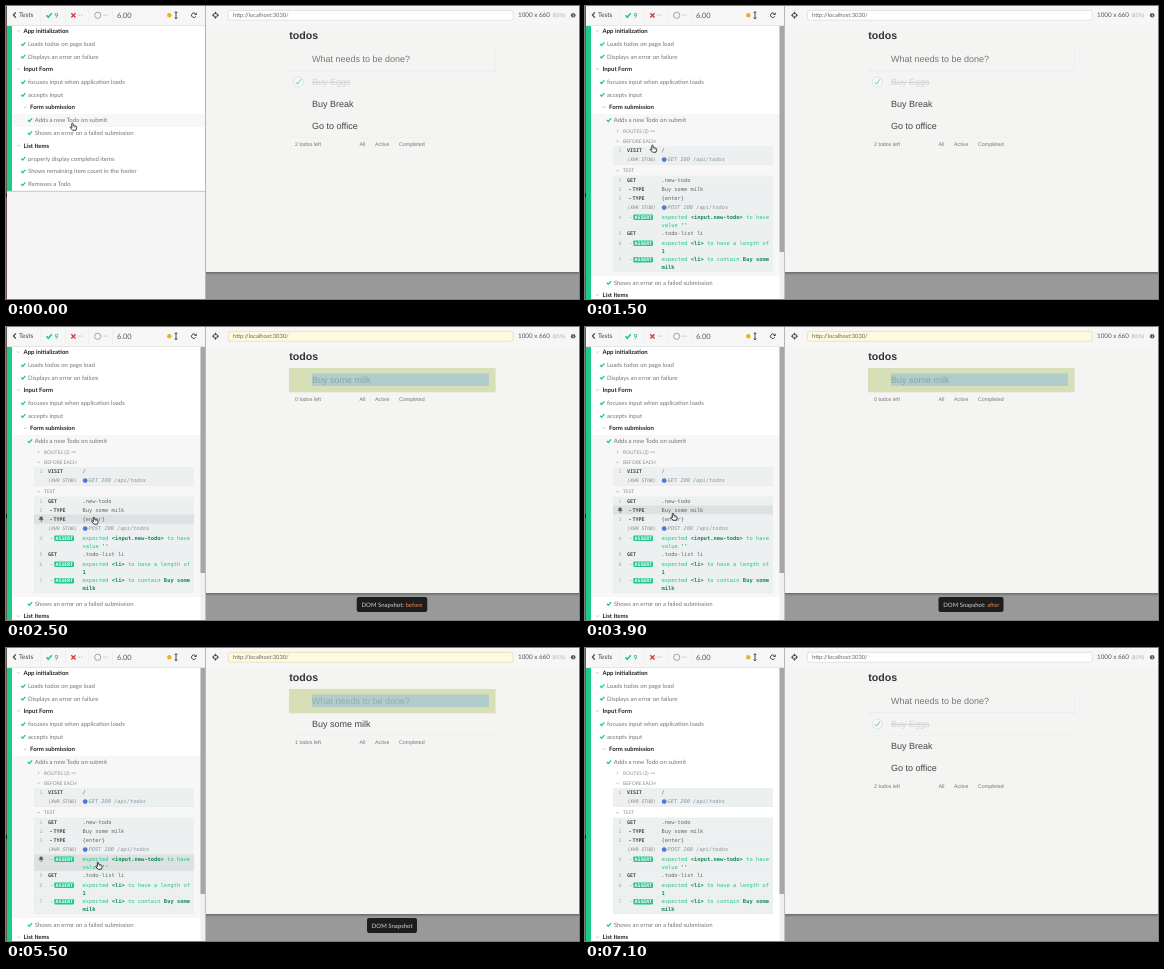
Animation, 573 px wide and 293 px high, one loop 7.5 s. Source, as an HTML page with a canvas:

```html
<!DOCTYPE html>
<html lang="en">
<head>
<meta charset="utf-8">
<title>Test runner</title>
<style>
html, body { margin: 0; width: 100%; height: 100%; overflow: hidden; background: #f5f5f5; }
canvas { display: block; width: 573px; height: 293px; }
</style>
</head>
<body>
<canvas id="stage"></canvas>
<script>
const W = 573, H = 293, LOOP = 7500, STEP = 100;
const UI = 'Lato, sans-serif';
const PAGE = '"Liberation Sans", sans-serif';
const MONO = '"DejaVu Sans Mono", monospace';
const GREEN = '#1fc98a', DARK_GREEN = '#14a56d';

const canvas = document.getElementById('stage');
const ctx = canvas.getContext('2d');
const scale = window.devicePixelRatio || 1;
canvas.width = Math.round(W * scale);
canvas.height = Math.round(H * scale);

// Pointer tip: time, x, y
const PATH = [
  [0, 66.5, 116], [1200, 66.5, 116], [1800, 68.5, 160], [2000, 74, 167],
  [2100, 79, 174], [2200, 83, 179.5], [2300, 86, 183], [2400, 86, 183],
  [2500, 88, 189], [2700, 88.5, 193.5], [2800, 88.5, 193.5], [3100, 88, 183],
  [3800, 88, 183], [3900, 88, 185], [4000, 88, 189], [4100, 88.5, 193],
  [4700, 88.5, 193], [4800, 88.5, 194.5], [5500, 92, 213], [6700, 92, 213],
  [6800, 75, 214], [6900, 45, 216], [7000, 10, 218]
];

const ROWS = [
  { id: 'visit', top: 140, bottom: 149, num: 1, name: 'VISIT', text: '/' },
  { id: 'load', top: 149, bottom: 159, stub: 'GET 200 /api/todos' },
  { id: 'get', top: 169.5, bottom: 178.5, num: 1, name: 'GET', text: '.new-todo' },
  { id: 'type', top: 178.5, bottom: 187.5, num: 2, name: 'TYPE', child: true, text: 'Buy some milk' },
  { id: 'enter', top: 187.5, bottom: 197, num: 3, name: 'TYPE', child: true, text: '{enter}' },
  { id: 'post', top: 197, bottom: 206.5, stub: 'POST 200 /api/todos' },
  { id: 'assert', top: 206.5, bottom: 223, num: 4, claim: ['expected ', '*<input.new-todo>', ' to have'], rest: "value *''" },
  { id: 'items', top: 223, bottom: 232.5, num: 5, name: 'GET', text: '.todo-list li' },
  { id: 'count', top: 232.5, bottom: 249, num: 6, claim: ['expected ', '*<li>', ' to have a length of'], rest: '*1' },
  { id: 'contain', top: 249, bottom: 266, num: 7, claim: ['expected ', '*<li>', ' to contain ', '*Buy some'], rest: '*milk' }
];

const NEW_TODO = [{ text: 'Buy some milk' }];
const FULL = [{ text: 'Buy Eggs', done: true }, { text: 'Buy Break' }, { text: 'Go to office' }];
const HINT = 'What needs to be done?';
const LIVE = { hint: true, input: HINT, items: FULL, left: 2 };
const snap = (input, lit, label, items = []) =>
  ({ input, lit, label, items, left: items.length, hint: input === HINT, shot: true });

function view(id, t) {
  switch (id) {
    case 'visit':
    case 'load': return snap(HINT, false, '');
    case 'get': return snap(HINT, true, '');
    case 'type': return t >= 3900 ? snap('Buy some milk', true, 'after') : snap('', true, 'before');
    case 'enter': return snap('Buy some milk', true, 'before');
    case 'post': return snap('Buy some milk', false, '');
    case 'assert': return snap(HINT, true, '', NEW_TODO);
    default: return LIVE;
  }
}

function pointer(t) {
  if (t >= 7100) return null;
  const i = PATH.findIndex(p => p[0] > t);
  if (i < 0) return PATH[PATH.length - 1].slice(1);
  const [t0, x0, y0] = PATH[i - 1], [t1, x1, y1] = PATH[i];
  const k = (t - t0) / (t1 - t0);
  return [x0 + (x1 - x0) * k, y0 + (y1 - y0) * k];
}

function rect(x, y, w, h, color) {
  ctx.fillStyle = color;
  ctx.fillRect(x, y, w, h);
}

function round(x, y, w, h, r, fill, stroke) {
  ctx.beginPath();
  ctx.roundRect(x, y, w, h, r);
  ctx.fillStyle = fill;
  ctx.fill();
  if (stroke) {
    ctx.strokeStyle = stroke;
    ctx.lineWidth = 0.7;
    ctx.stroke();
  }
}

function text(str, x, y, size, color, family = UI, style = '') {
  ctx.font = `${style} ${size}px ${family}`;
  ctx.fillStyle = color;
  ctx.fillText(str, x, y);
  return ctx.measureText(str).width;
}

function line(points, color, width) {
  ctx.beginPath();
  points.forEach(([x, y], i) => i ? ctx.lineTo(x, y) : ctx.moveTo(x, y));
  ctx.strokeStyle = color;
  ctx.lineWidth = width;
  ctx.stroke();
}

function circle(x, y, r, fill, stroke, width = 0.8) {
  ctx.beginPath();
  ctx.arc(x, y, r, 0, Math.PI * 2);
  if (fill) { ctx.fillStyle = fill; ctx.fill(); }
  if (stroke) { ctx.strokeStyle = stroke; ctx.lineWidth = width; ctx.stroke(); }
}

const check = (x, y, s = 1) =>
  line([[x - 2 * s, y], [x - 0.6 * s, y + 1.5 * s], [x + 2.2 * s, y - 1.6 * s]], GREEN, 1.3 * s);
const caret = (x, y) => line([[x - 1.3, y - 0.7], [x, y + 0.6], [x + 1.3, y - 0.7]], '#999', 0.6);

function suite(title, x, y) {
  caret(x - 5, y);
  text(title, x, y + 2.1, 6, '#222', UI, 'bold');
}

function test(title, x, y) {
  check(x - 4.8, y);
  text(title, x, y + 2.1, 6, '#757575');
}

function refresh(x, y) {
  ctx.beginPath();
  ctx.arc(x, y, 2.3, 0.5, 5.4);
  ctx.strokeStyle = '#444';
  ctx.lineWidth = 1;
  ctx.stroke();
  ctx.beginPath();
  ctx.moveTo(x + 2.9, y - 3);
  ctx.lineTo(x + 2.9, y - 0.3);
  ctx.lineTo(x + 0.3, y - 0.3);
  ctx.fillStyle = '#444';
  ctx.fill();
}

function leftHeader() {
  rect(0, 0, 199, 19, '#f6f6f6');
  line([[9.8, 6.4], [7.4, 9], [9.8, 11.6]], '#444', 1.2);
  text('Tests', 13, 11.4, 6.5, '#444');
  check(43, 9.3, 1.25);
  text('9', 48.5, 11.7, 7, DARK_GREEN);
  line([[65.3, 7.3], [69.5, 11.5]], '#d83a3a', 1.4);
  line([[69.5, 7.3], [65.3, 11.5]], '#d83a3a', 1.4);
  text('--', 72, 11.4, 6.5, '#888');
  circle(91.7, 9.3, 3.1, null, '#999', 0.9);
  text('--', 97, 11.4, 6.5, '#888');
  for (const x of [34, 59, 82.5, 106.5]) rect(x, 2, 0.5, 15, '#e9e9e9');
  text('6.00', 111, 11.8, 7.4, '#5c5c5c');
  circle(163.3, 9.2, 2.2, '#e8b322');
  line([[170, 6], [170, 12.5]], '#333', 0.9);
  line([[168.7, 7], [170, 5.5], [171.3, 7]], '#333', 0.8);
  line([[168.7, 11.5], [170, 13], [171.3, 11.5]], '#333', 0.8);
  refresh(187.8, 9.2);
  rect(0, 19, 199, 0.7, '#dadada');
}

function command(row, hot) {
  const y = row.top + 4.6, base = y + 1.8;
  rect(28, row.top, 160, row.bottom - row.top, hot ? '#dce1e1' : '#edf0f0');
  rect(28, row.bottom - 0.4, 160, 0.4, '#e3e7e7');
  if (row.stub) {
    text('(XHR STUB)', 42, base, 4.8, '#888', MONO, 'italic');
    circle(79.2, y, 2.4, '#5178d6');
    text(row.stub, 82.5, base, 5.3, '#8b93a0', MONO, 'italic');
    return;
  }
  if (hot) {
    rect(33.6, y - 2.4, 3, 2.6, '#555');
    rect(32.9, y + 0.1, 4.4, 0.9, '#555');
    rect(34.8, y + 1, 0.7, 1.9, '#555');
  } else {
    text(row.num, 33.5, base, 4.8, '#aaa', MONO);
  }
  if (row.claim) {
    text('-', 44, base, 5, '#666', MONO);
    round(48.3, y - 2.7, 19.7, 5.5, 0.8, GREEN);
    text('ASSERT', 49.6, y + 1.7, 4.8, '#fff', MONO, 'bold');
    let x = 76.5;
    for (const part of row.claim) x += claim(part, x, base);
    x = 76.5;
    for (const part of row.rest.split(/(?=\*)/)) x += claim(part, x, base + 8);
    return;
  }
  if (row.child) text('-', 43.5, base, 5, '#444', MONO, 'bold');
  text(row.name, row.child ? 47.5 : 42, base, 5, '#444', MONO, 'bold');
  text(row.text, 76.5, base, 5.35, '#666', MONO);
}

function claim(part, x, y) {
  const bold = part[0] === '*';
  return text(bold ? part.slice(1) : part, x, y, 5.42, bold ? '#108a5b' : GREEN, MONO, bold ? 'bold' : '');
}

function leftPanel(open, hover, hotId) {
  rect(0, 0, 199, H, '#f5f5f5');
  const end = open ? H : 185;
  rect(1, 19, 198, end - 19, '#fff');
  if (hover) rect(6, 108, 193, open ? 162 : 13, '#f7f7f7');
  rect(1, 20, 5, end - 20, GREEN);
  suite('App initialization', 17.5, 25);
  test('Loads todos on page load', 22, 38);
  test('Displays an error on failure', 22, 50.5);
  suite('Input Form', 17.5, 63);
  test('focuses input when application loads', 22, 76);
  test('accepts input', 22, 88.7);
  suite('Form submission', 24, 101.2);
  test('Adds a new Todo on submit', 28.7, 114);
  if (open) {
    line([[32, 123.8], [33.2, 125], [32, 126.2]], '#999', 0.6);
    text('ROUTES (2)', 38, 126.8, 4.9, '#8c8c8c');
    rect(65.5, 124.7, 4.5, 0.7, '#999');
    caret(32.5, 135.3);
    text('BEFORE EACH', 38, 137, 4.9, '#8c8c8c');
    caret(32.5, 164.7);
    text('TEST', 38, 166.4, 4.9, '#8c8c8c');
    for (const row of ROWS) command(row, row.id === hotId);
    test('Shows an error on a failed submission', 28.7, 276.7);
    suite('List Items', 17.5, 289.2);
    rect(194.5, 20, 4.7, 273, '#f0f0f0');
    rect(194.5, 20, 4.7, 226, '#a6a6a6');
  } else {
    test('Shows an error on a failed submission', 28.7, 127);
    suite('List Items', 17.5, 139.6);
    test('properly display completed items', 22, 152.5);
    test('Shows remaining item count in the footer', 22, 165.2);
    test('Removes a Todo', 22, 178);
    rect(1, 184.8, 198, 1, '#c8c8c8');
  }
  leftHeader();
  rect(0, 0, 1, H, '#6a5450');
  rect(0, 187, 1, 4, '#222');
}

function rightHeader(shot) {
  rect(199, 0, 374, 19, '#f6f6f6');
  circle(209.5, 9.2, 2.2, null, '#444', 0.9);
  for (const [dx, dy] of [[0, 1], [0, -1], [1, 0], [-1, 0]])
    line([[209.5 + dx, 9.2 + dy], [209.5 + dx * 3.5, 9.2 + dy * 3.5]], '#444', 0.9);
  round(222.4, 4.4, 284.8, 9.8, 2, shot ? '#fff9e0' : '#fff', shot ? '#e6d9ae' : '#d8d8d8');
  text('http://localhost:3030/', 227, 11.3, 5.75, '#666');
  text('1000 x 660', 512, 11.3, 6.3, '#555');
  text('(85%)', 546.5, 11, 5.1, '#aaa');
  circle(567.2, 9.2, 2.3, '#555');
  rect(566.9, 8.8, 0.7, 1.8, '#fff');
  rect(566.9, 7.6, 0.7, 0.7, '#fff');
}

function todoItem(item, y) {
  if (item.done) {
    circle(292.2, y, 5.1, '#f8f8f8', '#cfe4de', 0.8);
    line([[289.8, y], [291.6, y + 2.2], [295, y - 2.8]], '#5dc2a8', 0.9);
  }
  const w = text(item.text, 306, y + 3.2, 9, item.done ? '#d2d2d2' : '#454545', PAGE);
  if (item.done) rect(306, y, w, 0.7, '#cdcdcd');
  rect(283, y + 11, 207, 0.5, '#ebebeb');
}

function rightPanel(state) {
  rect(199, 19, 374, 274, '#f4f4f3');
  rect(199, 266, 374, 27, '#999');
  const shade = ctx.createLinearGradient(0, 266, 0, 269);
  shade.addColorStop(0, '#6a6a6a');
  shade.addColorStop(1, '#999');
  rect(199, 266, 374, 3, shade);
  text('todos', 283.3, 33.4, 10.6, '#333', PAGE, 'bold');
  rect(283, 64.5, 207, 0.8, '#e8e8e8');
  rect(489.3, 41, 0.7, 24, '#ececec');
  if (state.lit) {
    rect(283, 41, 206.5, 24.2, '#d6dfb5');
    rect(306, 46.5, 177, 12.5, '#b1ccca');
  }
  const ink = state.lit ? (state.hint ? '#94adad' : '#8aa4a5') : (state.hint ? '#777' : '#4d4d4d');
  text(state.input, 306, 55.7, 9, ink, PAGE);
  state.items.forEach((item, i) => todoItem(item, 76 + 22 * i));
  const y = 74.2 + 22 * state.items.length;
  text(`${state.left} todos left`, 289, y, 5.3, '#777', PAGE);
  text('All', 353.5, y, 5.3, '#777', PAGE);
  text('Active', 369, y, 5.3, '#777', PAGE);
  text('Completed', 393, y, 5.3, '#777', PAGE);
  rightHeader(state.shot);
  rect(199, 0, 1, H, '#b5b5b5');
  if (state.shot) badge(state.label);
}

function badge(label) {
  const w = { before: 70.5, after: 65 }[label] || 50;
  const x = 386 - w / 2;
  round(x, 270, w, 15, 2, '#1d1d1d');
  const used = text(label ? 'DOM Snapshot: ' : 'DOM Snapshot', x + 4.8, 279.5, 6, '#d2d2d2');
  text(label, x + 4.8 + used, 279.5, 6, '#e8884c');
}

function hand(x, y) {
  ctx.save();
  ctx.translate(x, y + 1);
  ctx.scale(0.87, 0.87);
  ctx.beginPath();
  ctx.moveTo(-0.9, 0.7);
  ctx.quadraticCurveTo(0, -0.5, 0.7, 0.7);
  ctx.lineTo(1, 3);
  ctx.lineTo(4, 3.7);
  ctx.quadraticCurveTo(5, 4, 4.8, 5.2);
  ctx.lineTo(4, 8.3);
  ctx.lineTo(0, 8.3);
  ctx.lineTo(-2.6, 5.3);
  ctx.quadraticCurveTo(-2.6, 4.1, -1.5, 4.6);
  ctx.lineTo(-0.6, 5.3);
  ctx.closePath();
  ctx.fillStyle = '#fff';
  ctx.fill();
  ctx.strokeStyle = '#222';
  ctx.lineWidth = 1;
  ctx.stroke();
  line([[1.7, 3.8], [1.8, 5.2]], '#444', 0.5);
  line([[3.2, 4.1], [3.2, 5.4]], '#444', 0.5);
  ctx.restore();
}

function draw(time) {
  const t = Math.floor((time % LOOP) / STEP) * STEP;
  const open = t >= 900;
  const tip = pointer(t);
  const hot = open && tip && tip[0] > 28 && tip[0] < 188 &&
    ROWS.find(r => tip[1] >= r.top && tip[1] < r.bottom);
  const id = hot ? hot.id : '';
  ctx.setTransform(scale, 0, 0, scale, 0, 0);
  ctx.textRendering = 'geometricPrecision';
  rightPanel(view(id, t));
  leftPanel(open, tip !== null, id);
  if (tip) hand(...tip);
}

const start = performance.now();
function tick() {
  draw(performance.now() - start);
  requestAnimationFrame(tick);
}
tick();
</script>
</body>
</html>
```
